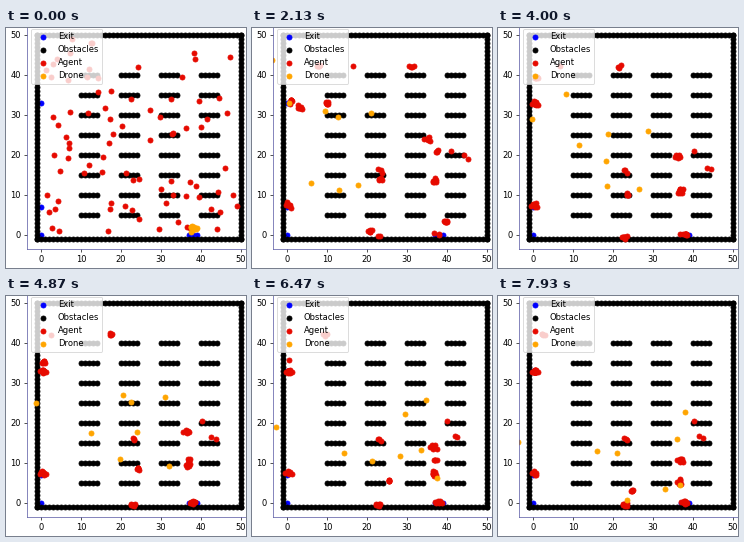
Recreate the animation shown at these times as a matplotlib script. Size 240 by 240 pixels, loop 8 s.

```python
import numpy as np
import matplotlib.pyplot as plt
from matplotlib.animation import FuncAnimation

FRAMES = 120
LOOP_MS = 8000
GATHERED = 17                # frame at which the flocks have formed
AGENTS = 85
rng = np.random.default_rng(11)

WEST, LOW_WEST = (0.5, 32.8), (0.4, 7.3)
SOUTH, GATE, CORNER = (23, -0.6), (38, 0.1), (1, 42)

# Walking speed per frame, width and height of the flock, its waypoints
FLOCKS = [
    (0, .8, .6, [WEST]),
    (0, .8, .6, [LOW_WEST]),
    (0, .6, .4, [SOUTH]),
    (0, 2, .3, [GATE]),
    (0, .8, .5, [(23.3, 16)]),
    (.02, .3, .5, [(41.3, 21), (40, 20.5)]),
    (.1, .9, .3, [(4.5, 31.2), WEST]),
    (.3, .1, .1, [(3.4, 37), WEST]),
    (.6, .1, .1, [(18.5, 33), WEST]),
    (.33, .3, .2, [(12.5, 42.4), CORNER, WEST]),
    (.33, 1, .5, [(21, 42.2), CORNER, WEST]),
    (.33, .9, .2, [(35.8, 42), CORNER, WEST]),
    (.17, .7, .4, [(18.9, 2.4), SOUTH]),
    (.13, .1, .1, [(23.3, 15.6), (23.5, 10.5), (25.7, 5), SOUTH]),
    (.17, .7, .2, [(40.8, 5.4), GATE]),
    (.095, .6, .7, [(36.9, 14.7), (36.7, 5)]),
    (.155, .9, .7, [(34.2, 25.9), (36, 22), (36.8, 10)]),
    (.33, .5, .2, [(37.2, 25.5), (37.6, 15.6), (37, 10.7)]),
    (.1, 1.2, .5, [(45.3, 20.7), (44.4, 16), (42.6, 16.3)]),
]

DRONE_KEYS = [0, GATHERED, 47, 87, FRAMES - 1]
DRONES = [
    [(.6, 33), (.6, 33), (-2.4, 20.6), (-3.8, 15)],
    [(8.4, 34), (10.6, 27.4), (13.4, 12), (16.2, 13)],
    [(10.9, 33), (15, 25.3), (26.4, 25), (36.4, 15.5)],
    [(16.1, 34.6), (26.6, 25.4), (33.2, 27), (38.2, 22.4)],
    [(15, 11.4), (21, 13.4), (37.8, 7), (36.8, 4.3)],
    [(9.2, 9.1), (17.1, 13.6), (21.3, 9.3), (20.9, 12.6)],
    [(.4, 7.4), (12.2, 19.3), (30.5, 16.9), (23.4, .1)],
    [(-3.8, 43.6), (-3.8, 43.6), (33.6, 17.8), (32.9, 3)],
]


def along(keys, points, t):
    return np.array([np.interp(t, keys, axis) for axis in np.transpose(points)])


def walk(path, dist):
    """Point reached after walking dist along the waypoints."""
    steps = np.linalg.norm(np.diff(path, axis=0), axis=1)
    return along(np.append(0, np.cumsum(steps)), path, dist)


def gather(start):
    """Flock of each agent and its place inside that flock."""
    meet = np.array([path[0] for *_, path in FLOCKS])
    reach = np.linalg.norm(start[:, None] - meet, axis=2)
    flock = reach.argmin(axis=1)
    for j in range(len(FLOCKS)):
        if j not in flock:
            flock[reach[:, j].argmin()] = j
    offset = np.zeros_like(start)
    for j, (_, wide, tall, _) in enumerate(FLOCKS):
        members = np.flatnonzero(flock == j)
        k = np.arange(len(members))
        r = np.sqrt(k / max(len(members) - 1, 1))
        offset[members] = np.stack(
            [wide * r * np.cos(2.4 * k), tall * r * np.sin(2.4 * k)], axis=1)
    return flock, offset


start = rng.uniform(0, 49, (AGENTS, 2))
flock, offset = gather(start)
jitter = rng.normal(0, .13, (FRAMES, AGENTS, 2))
pad = rng.uniform(-.8, .8, (len(DRONES), 2)) + (38.2, 1.3)


def agents_at(i):
    centre = np.array([walk(path, speed * max(i - GATHERED, 0))
                       if speed else path[0]
                       for speed, _, _, path in FLOCKS])
    u = 1 - (1 - min(i / GATHERED, 1)) ** 1.6
    return start * (1 - u) + (centre[flock] + offset + jitter[i]) * u


def drones_at(i):
    return np.array([along(DRONE_KEYS, [p, *path], i)
                     for p, path in zip(pad, DRONES)])


def obstacles():
    side = np.arange(-1, 51)
    walls = [p for s in side for e in (-1, 50) for p in ((s, e), (e, s))]
    shelves = [(x + k, y) for x in range(10, 41, 10) for k in range(5)
               for y in range(5, 41, 5)]
    return np.array(walls + shelves)


fig = plt.figure(figsize=(4, 4), dpi=60, facecolor="white")
ax = fig.add_axes([20.8 / 240, 19.2 / 240, 224.4 / 240, 224.4 / 240])
ax.set(xlim=(-3.55, 52.55), ylim=(-3.55, 52.55),
       xticks=range(0, 51, 10), yticks=range(0, 51, 10))
for spine in ax.spines.values():
    spine.set_color("#4c4c9c")

exits = np.array([(0, 0), (0, 7), (0, 33), (37, 0), (38, 0), (39, 0)])
ax.scatter(*exits.T, c="blue", label="Exit")
ax.scatter(*obstacles().T, c="black", label="Obstacles")
agents = ax.scatter(*start.T, c="#e60a00", label="Agent")
drones = ax.scatter(*pad.T, c="orange", label="Drone")
ax.legend(loc="upper left")


def update(i):
    agents.set_offsets(agents_at(i))
    drones.set_offsets(drones_at(i))
    return agents, drones


anim = FuncAnimation(fig, update, frames=FRAMES, interval=LOOP_MS / FRAMES,
                     repeat=True, repeat_delay=0)
plt.show()
```
